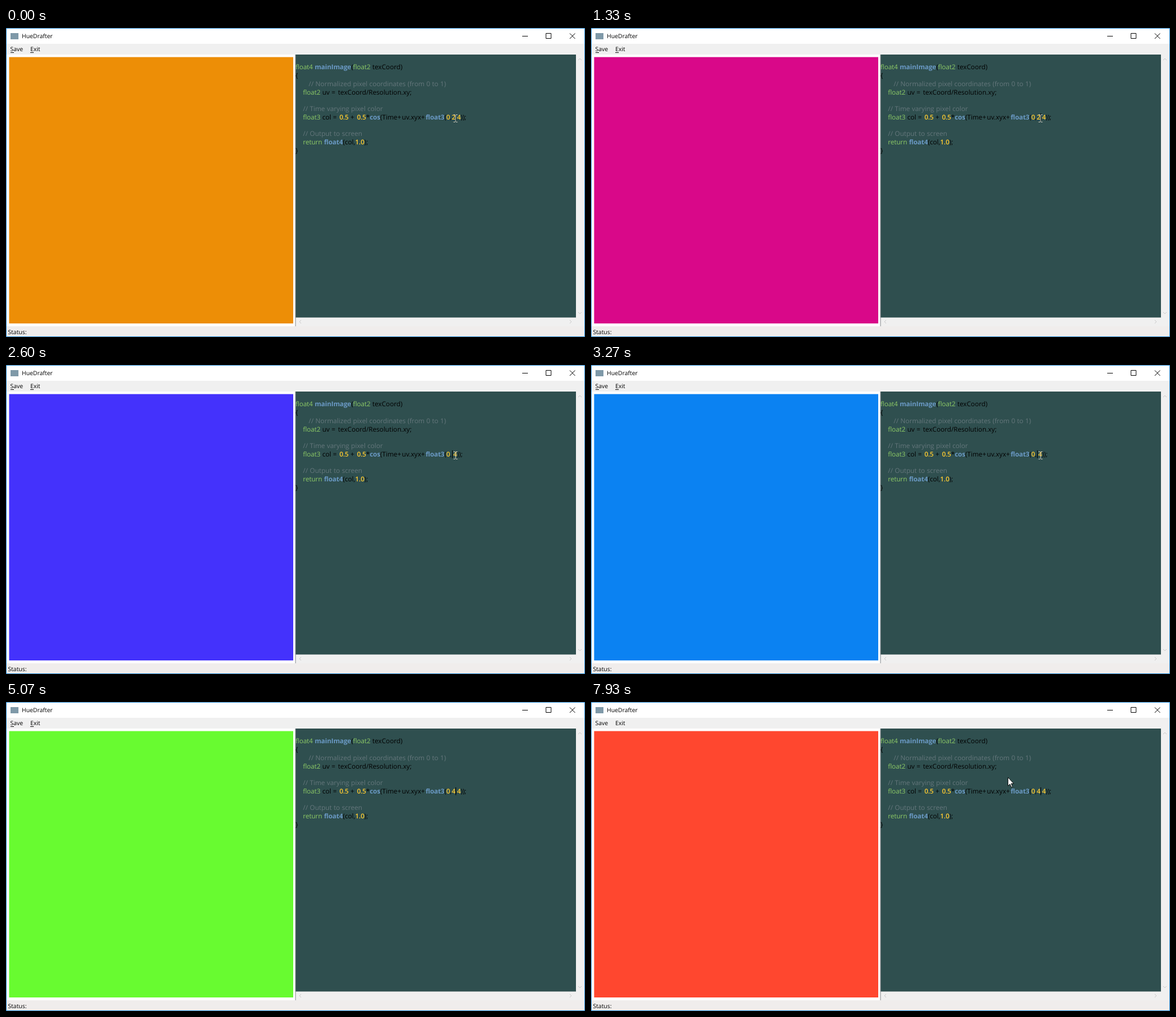
Write an HTML page that moves like this. It is 1024x547 px and loops after 8000 ms.

```html
<!DOCTYPE html>
<html lang="en">
<head>
<meta charset="utf-8">
<title>HueDrafter</title>
<style>
  html, body { margin: 0; width: 100%; height: 100%; overflow: hidden; background: #fff; }
  svg { display: block; width: 1024px; height: 547px; }
  text { font: 10.4px "Open Sans", "Noto Sans", sans-serif; white-space: pre; text-rendering: geometricPrecision; }
  #code text { font-size: 11.7px; word-spacing: .3px; }
  .type { fill: #8dca66; font-weight: 500; letter-spacing: -.1px; }
  .fn { fill: #6a99c4; font-weight: 700; letter-spacing: -.15px; }
  .num { fill: #ffcb30; font-weight: 600; letter-spacing: -.15px; }
  .op { letter-spacing: 1.4px; }
  .note { fill: #65777c; }
  .line { fill: none; stroke: #000; }
  .bar { fill: none; stroke: #c9c9c9; }
</style>
</head>
<body>
<svg viewBox="0 0 1024 547">
  <rect width="1024" height="547" fill="#fff"/>
  <rect y="28" width="1024" height="19" fill="#f0f0f0"/>
  <rect y="528" width="1024" height="19" fill="#f0edec"/>
  <rect x="512" y="47" width="512" height="481" fill="#f0f0f0"/>
  <rect x="512" y="47" width="496" height="465.500" fill="#2f4f4f"/>
  <rect x="511.500" y="47" width="1" height="481" fill="#82878c"/>
  <rect id="view" x="5.500" y="51.500" width="502.500" height="471.500"/>
  <rect x=".5" y=".5" width="1023" height="546" fill="none" stroke="#1a80cc"/>
  <rect x="8" y="9" width="14" height="11" fill="#7f99a8"/>
  <rect id="hover" x="1.500" y="29.500" width="34" height="17" fill="#cce8ff" stroke="#99d1ff"/>
  <path class="line" d="M913 14.500h10M955 9.500h9v9h-9zM997 9.500l9.500 9.500M1006.500 9.500l-9.500 9.500"/>
  <path class="bar" d="M1012 57l3-3 3 3M1012 503l3 3 3-3M522 517l-3 3 3 3M997 517l3 3-3 3"/>
  <text x="28" y="18">HueDrafter</text>
  <text x="7.500" y="41.300">Save</text>
  <text x="43" y="41.300">Exit</text>
  <text x="3.500" y="542.200">Status:</text>
  <path id="keys" class="line" d="M8 43.500h6M43 43.500h6"/>
  <g id="code"></g>
  <rect id="caret" y="151" width="1" height="14"/>
  <path id="beam" fill="none" stroke="#d3cfc4" d="M-3.500 .5h2.500l1 1 1-1h2.500M0 1.500v11M-3.500 13.500h2.500l1-1 1 1h2.500"/>
  <path id="arrow" fill="#fff" stroke="#000" stroke-width=".9" d="M.5 .5V15.500L4 12.300 6.400 17.800 8.500 16.900 6.200 11.500H10.700Z"/>
</svg>
<script>
const LOOP = 8000, FPS = 15, BLINK = 530;
const ERASE = 2200, STALL = 3750, RESUME = 4530, TYPE = 5070, MOVE = 5270, SAVE = 6730, DONE = 6870;
const $ = id => document.getElementById(id);
const show = (el, on) => el.setAttribute("visibility", on ? "visible" : "hidden");

const source = digit => `float4 mainImage(float2 texCoord)
{
       // Normalized pixel coordinates (from 0 to 1)
    float2 uv = texCoord/Resolution.xy;

    // Time varying pixel color
    float3 col = 0.5 + 0.5*cos(Time+uv.xyx+float3(0,${digit},4));

    // Output to screen
    return float4(col,1.0);
}`;

const token = /(?<note>\/\/.*)|(?<fn>\b\w+(?=\())|(?<type>\bfloat\d|return)|(?<num>\b\d(\.\d)?)|(?<op>[=+])/g;

function highlight(line) {
  return line.replace(token, (str, ...rest) => {
    const kind = Object.entries(rest.at(-1)).find(([, v]) => v)[0];
    return `<tspan class="${kind}">${str}</tspan>`;
  });
}

let shown = null;
function setCode(digit) {
  if (digit === shown) return;
  shown = digit;
  $("code").innerHTML = source(digit).split("\n")
    .map((line, i) => `<text x="512" y="${73.2 + i * 14.77}">${highlight(line)}</text>`).join("");
}

// Pointer: time, x, y; eased between the stops
const stops = [[5200, 795, 153], [5800, 250, 15], [6470, 24, 34], [7000, 24, 34], [7930, 737, 133]];

function pointer(t) {
  const i = stops.findIndex(s => s[0] > t);
  if (i <= 0) return stops.at(i).slice(1);
  const [a, b] = [stops[i - 1], stops[i]];
  const k = (t - a[0]) / (b[0] - a[0]);
  const e = k * k * (3 - 2 * k);
  return [1, 2].map(n => a[n] + (b[n] - a[n]) * e);
}

// While the program is busy its clock stands still
const stalls = [[STALL, RESUME], [6070, SAVE], [6850, LOOP]];

function clock(t) {
  const stall = stalls.find(([from, to]) => t >= from && t < to);
  return stall ? stall[0] : t;
}

// The blink restarts at each key press and freezes with the program
function caretOn(t) {
  const since = t >= TYPE ? TYPE : t >= ERASE ? ERASE : BLINK / 2 - 2 * BLINK;
  const until = t >= TYPE ? Math.min(t, 6200) : clock(t);
  return Math.floor((until - since) / BLINK) % 2 === 0;
}

function draw(now) {
  // Screen refreshes fall on whole hundredths of a second
  const t = Math.round(Math.floor((now % LOOP + 4) * FPS / 1000) * 100 / FPS) * 10;

  const T = clock(t) / 1000 - 0.54;
  const rgb = [0, 2, 4].map(p => Math.round(255 * (0.5 + 0.5 * Math.cos(T + p))));
  $("view").setAttribute("fill", `rgb(${rgb})`);

  const erased = t >= ERASE && t < TYPE;
  setCode(erased ? "" : t >= TYPE ? "4" : "2");
  $("caret").setAttribute("x", erased ? 789 : 795);
  show($("caret"), caretOn(t));

  const [x, y] = pointer(t);
  const inText = t < SAVE && x > 512 && y > 47;
  const hidden = t >= STALL && t < MOVE;
  for (const id of ["beam", "arrow"]) {
    $(id).setAttribute("transform", `translate(${Math.round(x)} ${Math.round(y)})`);
    show($(id), !hidden && (id === "beam") === inText);
  }
  show($("hover"), t >= SAVE && t < DONE);
  show($("keys"), t < DONE);
}

const start = performance.now();
function loop() {
  draw(performance.now() - start);
  requestAnimationFrame(loop);
}
loop();
</script>
</body>
</html>
```
